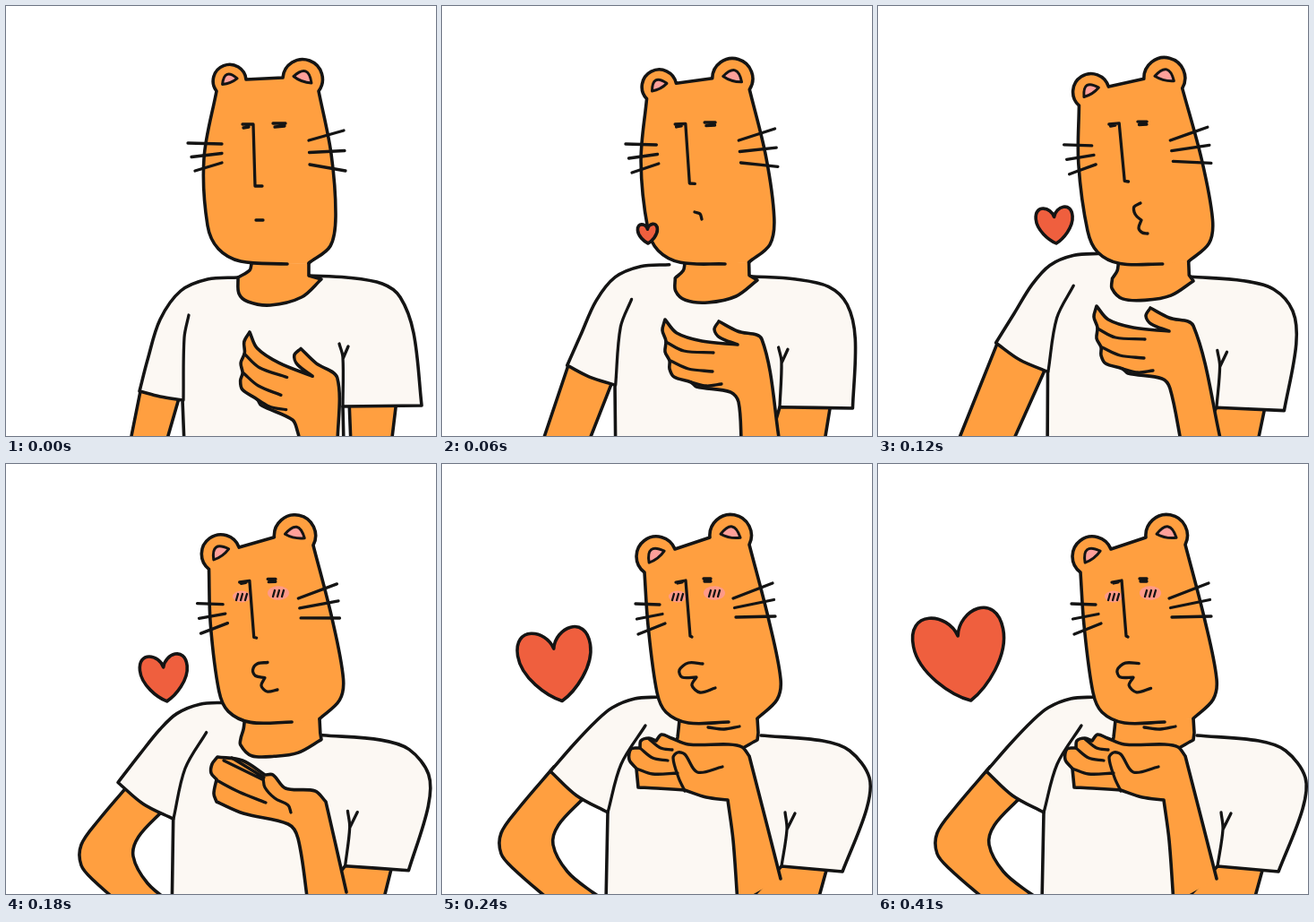
Recreate the animation shown at these times as an HTML page. Size 480x480 px, loop 480 ms.

```html
<!DOCTYPE html>
<html lang="en">
<head>
<meta charset="utf-8">
<title>Blown kiss</title>
<style>
  html, body { margin: 0; width: 100%; height: 100%; overflow: hidden; background: #fff; }
  svg { display: block; width: 100%; height: 100%; }
  path { fill: none; stroke: #141414; stroke-width: 3.6; stroke-linecap: round; stroke-linejoin: round; }
  .skin { fill: #ff9f40; }
  .cloth { fill: #fcf8f3; }
  .pink { fill: #ffa09a; stroke-width: 3; }
  .line { stroke-width: 3.3; }
  .thin { stroke-width: 2.3; }
  .heart { fill: #ef5f3e; vector-effect: non-scaling-stroke; }
  ellipse { fill: #ff9a88; }
  g { opacity: 0; animation: brief 480ms step-end calc(var(--at) * 60ms - 480ms) infinite; }
  g:last-child { animation-name: long; }
  @keyframes brief { 0% { opacity: 1 } 12.5%, 100% { opacity: 0 } }
  @keyframes long { 0% { opacity: 1 } 37.5%, 100% { opacity: 0 } }
</style>
</head>
<body>
<svg id="stage" viewBox="0 0 480 480"></svg>
<script>
// Points run through a smooth curve; "/" makes a corner, ";" lifts the pen.
// Each part is given at rest and fully lifted; the poses lie between.
const rig = {
  shirt: ["259,303 225,305 195,318 172,350 158,395 149,430 / 172,436 197,440 / 199,490 / 377,490 / 376,447 / 464,446 / 455,365 440,325 420,310 380,303 338,301",
          "243,260 215,262 190,272 172,287 148,312 121,343 / 150,370 185,389 / 183,490 / 340,490 / 379,449 / 447,455 / 474,385 477,350 455,320 425,309 356,303"],
  folds: ["204,345 199,370 198,440;372,377 376,392 376,447;382,380 376,394",
          "227,292 200,335 185,389;383,389 385,408 379,449;394,390 385,408"],
  neck: ["274,288 272,295 259,303 / 260,321 270,330 295,334 330,325 352,305 / 338,301 / 338,287",
         "265,286 264,296 263,305 / 262,312 275,325 300,325 325,322 352,308 / 353,300 / 352,284"],
  head: ["314,288 262,285 237,271 225,245 221,170 235,95 268,82 309,80 349,95 363,165 368,235 362,268 338,287",
         "320,288 275,289 250,277 240,255 230,180 226,121 260,95 299,82 343,90 365,175 378,240 374,263 352,284"],
  face: ["264,132 276,132 / 278,201 / 286,201;265,136 271,135;298,131 312,131;300,135 311,134",
         "261,132 272,130 / 277,192 / 279,193;263,133 268,132;292,128 300,128;293,131 300,131"],
  farArm: ["383,440 385,490 / 430,490 / 436,440", "350,430 350,490 / 419,490 / 430,450"],
  nearArm: ["151,425 138,490 / 178,490 / 193,438", "125,340 57,490 / 131,490 / 183,385"],
  wrist: ["329,490 370,490", "345,490 392,490"],
  upperWhiskers: ["203,153 241,154;377,139 338,150", "216,156 243,157;369,133 325,150"],
  lowerWhiskers: ["211,184 241,175;379,184 339,177", "219,190 249,178;372,170 328,171"]
};

const bentArm = "125,338 85,385 66,412 66,435 80,452 120,487 / 190,492 / 168,478 140,455 124,425 130,403 158,373";

const open = {
  tip: [249, 350],
  shape: "331,442 322,431 284,425 278,420 259,414 254,405 254,396 249,386 250,374 246,362 249,350 / 262,365 290,374 330,378 / 310,370 304,361 309,352 / 330,363 357,372",
  lines: "250,375 270,385 303,387;255,396 275,405 302,408;278,420 295,424 312,422"
};
const cupped = {
  shape: "337,490 326,418 315,402 265,390 235,377 / 232,368 235,352 / 229,345 230,335 236,327 / 264,331 289,347 / 298,347 312,362 345,365 357,377 / 368,425 380,478",
  lines: "287,350 289,361 300,373 315,381 318,389;243,331 286,352;252,328 288,350;235,353 260,366 290,378"
};
const curled = {
  shape: "330,490 325,420 319,375 / 295,372 271,364 / 240,362 219,361 / 217,340 / 209,330 211,318 221,317 / 222,309 231,306 239,309 / 245,302 256,306 / 275,313 320,313 335,316 343,326 / 362,400 378,463",
  lines: "221,317 235,328 252,331;217,340 235,346 263,345;231,307 244,317 257,319;271,365 264,350 258,328 263,322 271,324 285,344 313,338;297,294 315,296 332,293"
};

const flat = "279,239 287,239", frown = "282,230 288,232 290,238";
const pout = size => mix(
  "293,220 286,224 286,230 289,235 294,239 / 291,248 295,253 301,254",
  "291,223 275,222 265,230 268,238 284,238 / 279,247 288,255 305,250", size);

const poses = [
  { hand: open, tip: [272, 364], turn: 16, mouth: flat },
  { hand: open, tip: [249, 350], mouth: frown, sway: -4, heart: 22 },
  { hand: open, tip: [244, 335], mouth: pout(0), sway: -6, heart: 41 },
  { hand: cupped, elbow: [18, 13], mouth: pout(0.5), sway: -1, heart: 53 },
  { hand: curled, elbow: [0, 0], mouth: pout(1), heart: 82 },
  { hand: curled, elbow: [0, 0], mouth: pout(0.9), heart: 102 }
];

function mix(a, b, k) {
  const ends = b.match(/[\d.]+/g);
  let i = 0;
  return a.replace(/[\d.]+/g, n => (+n + (ends[i++] - n) * k).toFixed(1));
}

const move = (text, fn) => text.replace(/([-\d.]+),([-\d.]+)/g, (_, x, y) => fn(+x, +y).join());
const points = text => text.trim().split(" ").map(p => p.split(",").map(Number));
const gap = (a, b) => Math.hypot(b[0] - a[0], b[1] - a[1]);

// Control point beside b, with the tangent scaled to the side it leads to.
function handle(a, b, c) {
  const k = gap(b, c) / (gap(a, b) + gap(b, c)) / 3;
  return [0, 1].map(i => b[i] + (c[i] - a[i]) * k);
}

function curve(pts) {
  let d = "";
  for (let i = 1; i < pts.length; i++) {
    const [p, q] = [pts[i - 1], pts[i]];
    const before = pts[i - 2] || p, after = pts[i + 1] || q;
    d += `C${handle(before, p, q)} ${handle(after, q, p)} ${q}`;
  }
  return d;
}

function outline(text) {
  return text.split(";").map(stroke => {
    let d = "", last;
    for (const run of stroke.split("/")) {
      const pts = points(run);
      if (last) pts.unshift(last);
      else d = "M" + pts[0];
      d += curve(pts);
      last = pts[pts.length - 1];
    }
    return d;
  }).join("");
}

const path = (kind, d, extra = "") => `<path class="${kind}" d="${d}" ${extra}/>`;
const ink = (kind, text) => path(kind, outline(text));

function arc(p, q) {
  const r = gap(p, q) * 0.52;
  return `A${r} ${r} 0 1 1 ${q}`;
}

function innerEar(p, q) {
  const [dx, dy] = [q[0] - p[0], q[1] - p[1]];
  const at = (along, out) => [
    (p[0] + q[0]) / 2 + dx * along + dy * out,
    (p[1] + q[1]) / 2 + dy * along - dx * out
  ];
  const start = at(-0.25, 0.13);
  return path("pink", `M${start}Q${at(0, 0.6)} ${at(0.25, 0.13)}Q${at(0, 0.05)} ${start}Z`);
}

function drawHead(text) {
  const p = points(text);
  const d = `M${p[0]}${curve(p.slice(0, 6))}${arc(p[5], p[6])}L${p[7]}${arc(p[7], p[8])}${curve(p.slice(8))}`;
  return path("skin", d) + innerEar(p[5], p[6]) + innerEar(p[7], p[8]);
}

function drawBlush(x, y, r) {
  let d = "";
  for (let i = -1; i <= 1; i++) d += `M${x + i * 5 - 1},${y + 4}l2-7`;
  return `<ellipse cx="${x}" cy="${y}" rx="${r}" ry="${r * 0.65}"/>` + path("thin", d);
}

function drawHand({ hand, tip, turn = 0 }, wrist) {
  let { shape, lines } = hand;
  if (tip) {
    const a = turn * Math.PI / 180, c = Math.cos(a), s = Math.sin(a);
    const place = (x, y) => {
      x -= hand.tip[0];
      y -= hand.tip[1];
      return [tip[0] + x * c - y * s, tip[1] + x * s + y * c];
    };
    const [left, right] = wrist.split(" ");
    shape = `${left} ${move(shape, place)} ${right}`;
    lines = move(lines, place);
  }
  return ink("skin", shape) + ink("line", lines);
}

// The heart drifts up and to the left, tilting, as it grows.
function drawHeart(size) {
  const d = "M0-.22C-.06-.5-.5-.62-.5-.2C-.5 .1-.2 .4 0 .5C.2 .4 .5 .1 .5-.2C.5-.62 .06-.5 0-.22Z";
  return path("heart", d,
    `transform="translate(${267 - 1.7 * size} ${265 - size / 2}) rotate(${-size / 9}) scale(${size})"`);
}

function drawPose(pose, i) {
  const { sway = 0, elbow, mouth, heart } = pose;
  const lift = 1 - Math.max(0, 1 - i / 4) ** 1.4;
  const part = name => mix(...rig[name], lift);
  const lean = text => move(text, (x, y) => [x + sway * Math.max(0, 260 - y) / 180, y]);
  const arm = elbow ? move(bentArm, (x, y) => [x + elbow[0], y + elbow[1]]) : part("nearArm");
  const whiskers = [0, 0.5, 1].map(k => mix(part("upperWhiskers"), part("lowerWhiskers"), k));

  return `<g style="--at:${i}">` + [
    ink("skin", arm),
    ink("skin", part("farArm")),
    ink("cloth", part("shirt")),
    ink("line", part("folds")),
    ink("skin", part("neck")),
    drawHead(lean(part("head"))),
    elbow ? drawBlush(263, 148, 10) + drawBlush(304, 144, 12) : "",
    ink("line", lean(part("face"))),
    ink("line", mouth),
    ink("line", lean(whiskers.join(";"))),
    drawHand(pose, part("wrist")),
    heart ? drawHeart(heart) : ""
  ].join("") + "</g>";
}

document.getElementById("stage").innerHTML = poses.map(drawPose).join("");
</script>
</body>
</html>
```
